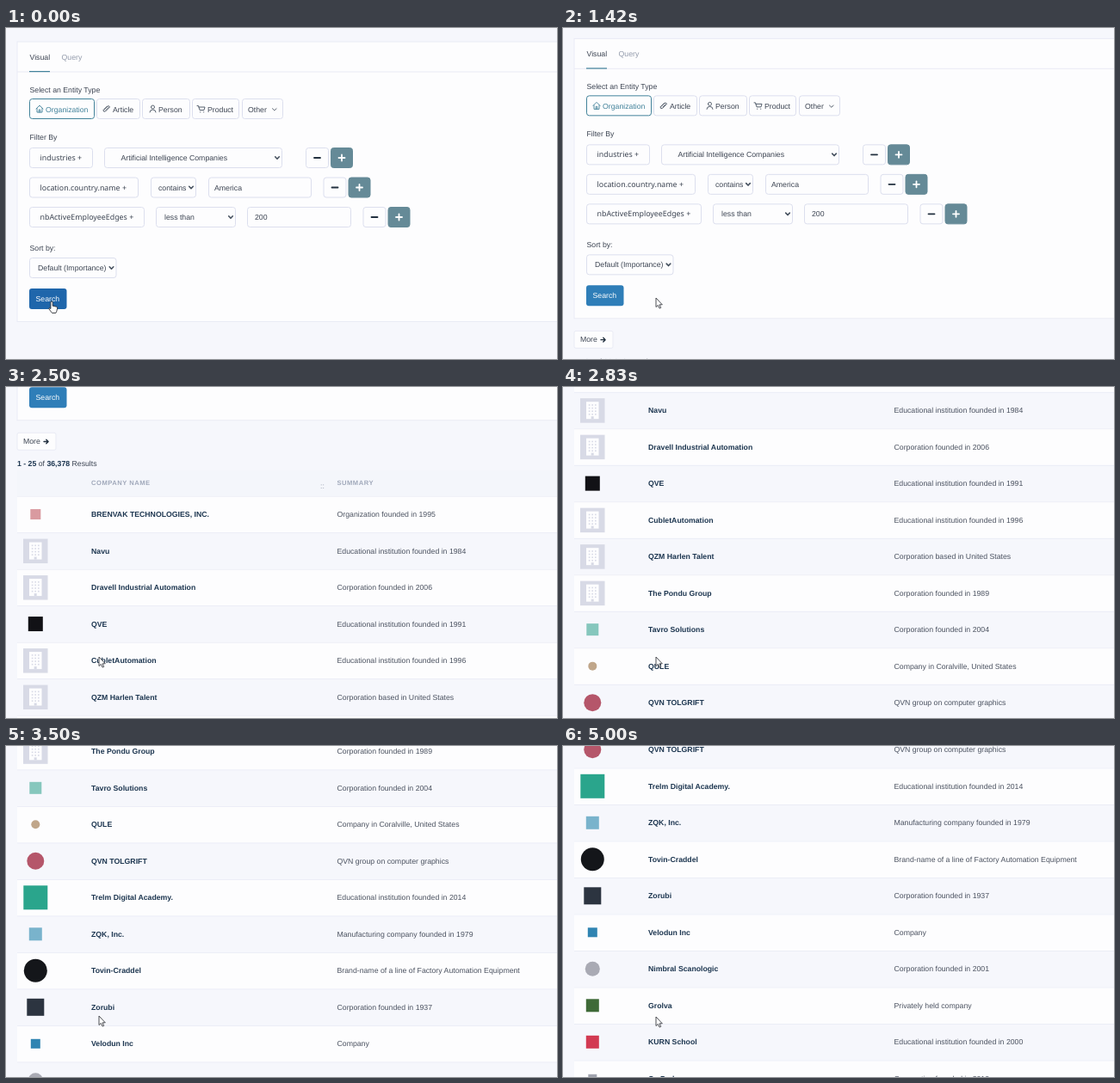
Write an HTML page that moves like this. It is 640 by 385 pixels and loops after 5160 ms.

```html
<!DOCTYPE html>
<html lang="en">
<head>
<meta charset="utf-8">
<title>Company search</title>
<style>
  html, body { margin: 0; width: 100%; height: 100%; overflow: hidden; background: #f6f7fc; }
  svg { display: block; width: 100%; height: 100%; }
  text { font: 8.72px "Liberation Sans", Arial, sans-serif; fill: #3c4452; white-space: pre; text-rendering: geometricPrecision; }
  .chip { font: 8.85px "Noto Sans", "Open Sans", sans-serif; }
  .name, .bold { font-weight: bold; fill: #1d3650; }
  .summary { fill: #4b5260; }
  .head { font-size: 7.6px; font-weight: bold; letter-spacing: .5px; fill: #a0a8ba; }
  .muted { fill: #939bab; }
  .teal { fill: #42829a; }
  .white { fill: #fff; }
  .line { fill: none; stroke-linecap: round; stroke-linejoin: round; }
</style>
</head>
<body>
<svg id="stage" viewBox="0 0 640 385" preserveAspectRatio="none"></svg>
<script>
const LOOP = 5160, STEP = 1000 / 12;
const CARD = '#fdfdfe', STRIPE = '#f6f7fc', BORDER = '#dcdfee', RULE = '#e9ebf5';
const INK = '#46515f', DARK = '#22303f', TEAL = '#42829a', SLATE = '#658a97', ICON = '#d8dae6';
const ROW_HEIGHT = 42.5, FIRST_ROW = 450.8;

const rect = (x, y, w, h, fill, extra = '') =>
  `<rect x="${x}" y="${y}" width="${w}" height="${h}" fill="${fill}" ${extra}/>`;
const text = (x, middle, content, cls = '') =>
  `<text x="${x}" y="${middle + 3.1}" class="${cls}">${content}</text>`;
const path = (d, width = 1, stroke = INK) =>
  `<path class="line" d="${d}" stroke-width="${width}" stroke="${stroke}"/>`;
const box = (x1, y, x2, fill = CARD, stroke = BORDER) =>
  rect(x1 + .5, y + .5, x2 - x1 - 1, 23, fill, `rx="3" stroke="${stroke}"`);
const caret = (x, y) => path(`M${x - 2.3} ${y - 1.2}l2.3 2.4 2.3-2.4`, 1.6);

const chip = (y, x2, label) => box(27, y, x2) + text(39.5, y + 12, label + ' +', 'chip');
const input = (x1, y, x2, label, textX) => box(x1, y, x2) + text(textX, y + 12, label);
const select = (x1, y, x2, label, textX) => input(x1, y, x2, label, textX) + caret(x2 - 6, y + 12);
const plusMinus = (x, y) =>
  box(x, y, x + 27) + path(`M${x + 10} ${y + 12}h7`, 1.8, DARK) +
  box(x + 29, y, x + 55, SLATE, SLATE) +
  path(`M${x + 38.5} ${y + 12}h7m-3.5-3.5v7`, 1.8, '#fff');

function form() {
  const entities = [
    [27, 103, 46, 'Organization', 'M35 94l4-4 4 4M36 93.5v4.5h6v-4.5M38.2 98v-3h1.6v3'],
    [105, 156, 124, 'Article', 'M114 95l4-4q2-1 2.5 1l-5 5q-2.5 1-2.5-1.5l4.5-4.5M116 95.5l3-3'],
    [158, 214, 177, 'Person', 'M168.5 92a2 2 0 1 0 4 0a2 2 0 1 0-4 0M167 98q0-3 3.5-3t3.5 3'],
    [216, 271, 234, 'Product', 'M222 90.5h1.5l1.5 5h5l1-3.5h-7M225.5 97.8h.3M229.5 97.8h.3'],
    [274, 322, 281, 'Other', 'M309.5 93.7l2.3 2.2 2.3-2.2']
  ];
  return rect(13, 16, 640, 325.5, CARD, `stroke="${RULE}"`) +
    text(27.5, 34, 'Visual') + text(64.5, 34, 'Query', 'muted') +
    rect(13, 50.5, 627, 1, RULE) + rect(27, 50, 24, 1.2, TEAL) +
    text(27.5, 71.5, 'Select an Entity Type') +
    entities.map(([x1, x2, labelX, label, icon], i) =>
      box(x1, 82, x2, CARD, i ? BORDER : TEAL) +
      path(icon, .9, i ? INK : TEAL) + text(labelX, 94.5, label, i ? '' : 'teal')
    ).join('') +
    text(27.5, 127, 'Filter By') +
    chip(139, 101, 'industries') +
    select(114, 139, 321, 'Artificial Intelligence Companies', 133.5) + plusMinus(348, 139) +
    chip(173.5, 154, 'location.country.name') + select(168, 173.5, 221, 'contains', 177) +
    input(235, 173.5, 355, 'America', 242) + plusMinus(368.5, 173.5) +
    chip(208, 161, 'nbActiveEmployeeEdges') + select(174, 208, 267, 'less than', 184) +
    input(280, 208, 401, '200', 289) + plusMinus(414.5, 208) +
    text(27.5, 256, 'Sort by:') + select(27, 267, 128.5, 'Default (Importance)', 37) +
    `<rect id="search" x="27" y="303" width="43.5" height="24" rx="3"/>` + text(34.5, 315, 'Search', 'white');
}

// Each row: name, summary, badge colour, badge size, round badge; no colour means the building icon.
const founded = (kind, year) => `${kind} founded in ${year}`;
const SCHOOL = 'Educational institution', CORP = 'Corporation';
const rows = [
  ['BRENVAK TECHNOLOGIES, INC.', founded('Organization', 1995), '#d99aa0', 12],
  ['Navu', founded(SCHOOL, 1984)],
  ['Dravell Industrial Automation', founded(CORP, 2006)],
  ['QVE', founded(SCHOOL, 1991), '#121216', 17],
  ['CubletAutomation', founded(SCHOOL, 1996)],
  ['QZM Harlen Talent', 'Corporation based in United States'],
  ['The Pondu Group', founded(CORP, 1989)],
  ['Tavro Solutions', founded(CORP, 2004), '#86c7bd', 14],
  ['QULE', 'Company in Coralville, United States', '#c0a68a', 10, true],
  ['QVN TOLGRIFT', 'QVN group on computer graphics', '#b5566a', 20, true],
  ['Trelm Digital Academy.', founded(SCHOOL, 2014), '#2aa58c', 28],
  ['ZQK, Inc.', founded('Manufacturing company', 1979), '#79b3cc', 15],
  ['Tovin-Craddel', 'Brand-name of a line of Factory Automation Equipment', '#14161a', 27, true],
  ['Zorubi', founded(CORP, 1937), '#2c3440', 20],
  ['Velodun Inc', 'Company', '#2f84b2', 11],
  ['Nimbral Scanologic', founded(CORP, 2001), '#a9aab4', 17, true],
  ['Grolva', 'Privately held company', '#3f6a38', 15],
  ['KURN School', founded(SCHOOL, 2000), '#d23a52', 15],
  ['Cu Pralen', founded(CORP, 2010), '#a0a3ae', 10]
];

function building(y) {
  let windows = '';
  for (let i = 0; i < 12; i++)
    windows += rect(29.8 + i % 3 * 3.6, y - 7 + Math.floor(i / 3) * 3.6, 1.6, 1.6, ICON);
  return rect(20, y - 14, 28.5, 28.5, ICON) + rect(27, y - 10, 14.5, 20, CARD) +
    windows + rect(32.7, y + 7, 3, 3, ICON);
}

function row([name, summary, color, size, round], i) {
  const y = FIRST_ROW + i * ROW_HEIGHT, top = y - ROW_HEIGHT / 2;
  const badge = color
    ? rect(34.3 - size / 2, y - size / 2, size, size, color, round ? `rx="${size / 2}"` : '')
    : building(y);
  return rect(13, top, 627, ROW_HEIGHT, i % 2 ? STRIPE : CARD) + rect(13, top, 627, .8, RULE) +
    badge + text(99, y, name, 'name') + text(384.5, y, summary, 'summary');
}

function results() {
  return rect(13, 356, 45, 20, CARD, `rx="2" stroke="${RULE}"`) + text(20, 366, 'More') +
    path('M44 366.3h5m-2.2-2.3l2.3 2.3-2.3 2.3', 1.4, DARK) +
    text(13, 392, '<tspan class="bold">1 - 25</tspan> of <tspan class="bold">36,378</tspan> Results') +
    rect(13, 399.5, 627, 31, '#f4f6fb') +
    text(99, 414, 'COMPANY NAME', 'head') + text(384.5, 414, 'SUMMARY', 'head') +
    text(365, 418, '::', 'muted') + rows.map(row).join('');
}

const stage = document.getElementById('stage');
stage.innerHTML = `<g id="page">${form()}<g id="results">${results()}</g></g>
  <path id="arrow" d="M0 0v10.5l2.4-2.1 1.7 3.7 1.6-.7-1.6-3.6h3.2z" fill="#fff" stroke="#393b42" stroke-width=".9"/>
  <path id="hand" d="M2 0q1.2 0 1.2 1.2v4l4.5 1q1.2.4 1 1.8l-.8 3.2-1 2.3h-4.4l-3.6-4.7q-.4-1.2 1-1l1 .8v-7.4q0-1.2 1.1-1.2z"
    fill="#fff" stroke="#2e3036" stroke-width=".9"/>`;
const [page, resultList, search, arrow, hand] =
  ['page', 'results', 'search', 'arrow', 'hand'].map(id => document.getElementById(id));

// Keys are [time, value, speed], joined by cubic Hermite curves.
function curve(keys, t) {
  if (t <= keys[0][0]) return keys[0][1];
  for (let i = 1; i < keys.length; i++) {
    const [t0, a, va] = keys[i - 1], [t1, b, vb] = keys[i];
    if (t > t1) continue;
    const d = t1 - t0, u = (t - t0) / d, w = 1 - u;
    return a * w * w * (1 + 2 * u) + b * u * u * (1 + 2 * w) + d * u * w * (va * w - vb * u);
  }
  return keys[keys.length - 1][1];
}

const scrollKeys = [[1250, 0, 0], [2083, 117, .32], [2833, 466, .43], [3500, 699.5, .32], [4000, 829, 0]];
const cursorX = [[250, 51, 0], [670, 92, 0], [920, 92, 0], [1250, 108, 0]];
const cursorY = [[250, 318, 0], [670, 327, 0], [920, 327, 0], [1250, 314, 0], [4960, 314, 0], [5000, 315, 0]];

function draw(now) {
  const t = Math.floor((now % LOOP + 5) / STEP) * STEP;
  const x = curve(cursorX, t), y = curve(cursorY, t);
  const overButton = x < 70, pressed = t > 160 && t < 1000;

  page.setAttribute('transform', `translate(0 ${-curve(scrollKeys, t)})`);
  resultList.style.display = t < 1000 ? 'none' : '';
  search.setAttribute('fill', overButton || pressed ? '#1f66ab' : '#2f7eb8');
  search.setAttribute('stroke', pressed ? '#9fc4e2' : 'none');
  search.setAttribute('stroke-width', 2);
  arrow.style.display = overButton ? 'none' : '';
  hand.style.display = overButton ? '' : 'none';
  (overButton ? hand : arrow).setAttribute('transform', `translate(${x} ${y})`);
  requestAnimationFrame(draw);
}
requestAnimationFrame(draw);
</script>
</body>
</html>
```
